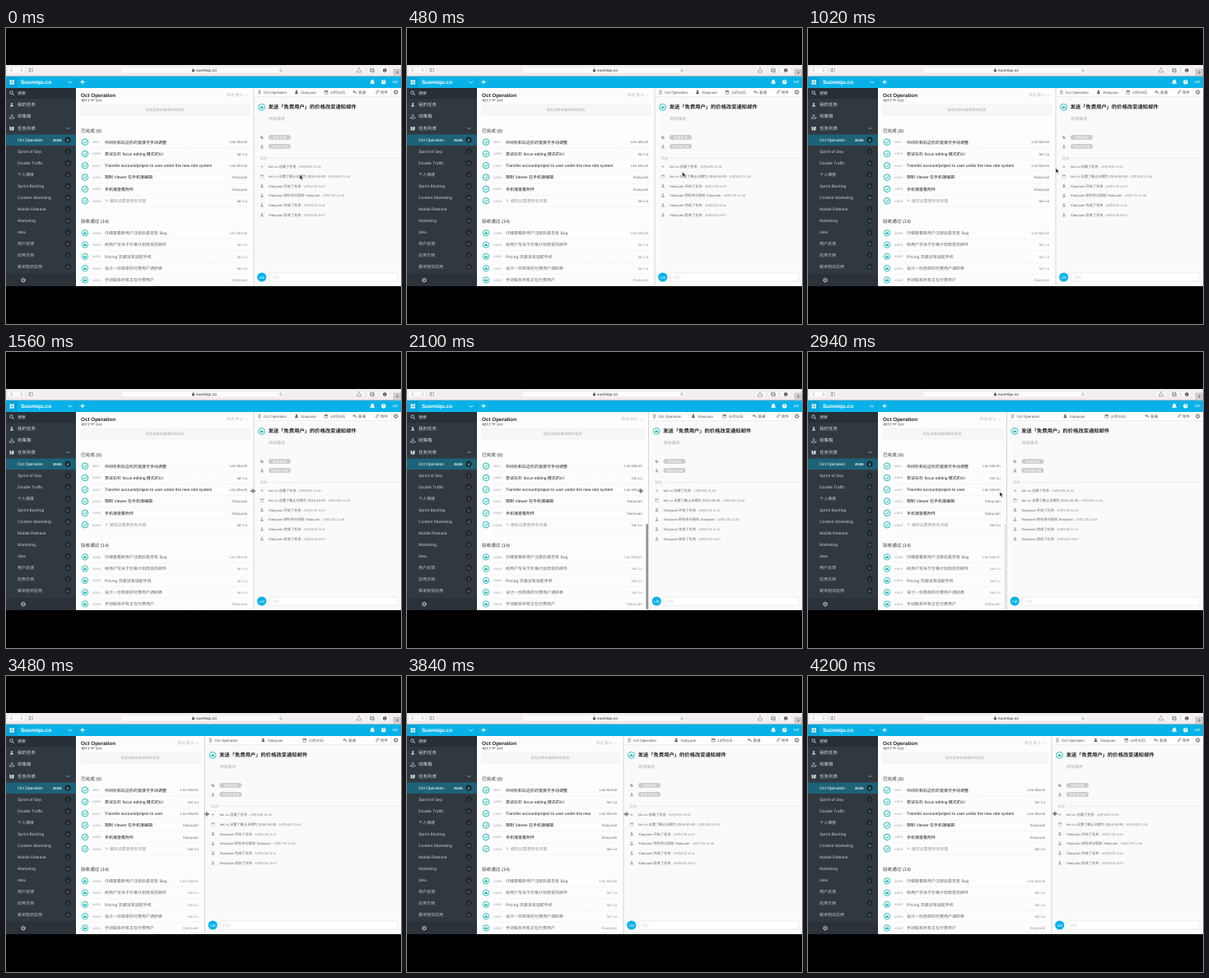
Recreate the animation shown at these times as an HTML page. Size 480 by 360 pixels, loop 4.26 s.

```html
<!DOCTYPE html>
<html lang="zh-CN">
<head>
<meta charset="utf-8">
<title>Task board</title>
<style>
html, body { margin: 0; width: 100%; height: 100%; overflow: hidden; background: #000; }
svg { display: block; width: 480px; height: 360px; }
text { font: 5px "Liberation Sans", "Noto Sans CJK SC", "Noto Sans CJK", sans-serif; text-rendering: geometricPrecision; white-space: pre; }
</style>
</head>
<body>
<svg id="stage" viewBox="0 0 480 360"></svg>
<script>
const LOOP = 4260, STEP = 60, HOME = 301;
const BLUE = '#08b2e8', TEAL = '#18b5b0';
const LEO = 'Leo Marsh', IAN = 'Ian Lu', YUAN = 'Xiaoyuan';
const LONG = 'Transfer account/project to user under the new role system';

// y is the vertical middle of the line
const text = (x, y, s, fill = '#333', size = 5, extra = '') =>
  `<text x="${x}" y="${y + size * .36}" fill="${fill}" style="font-size:${size}px;${extra}">${s}</text>`;
const BOLD = 'font-weight:700', END = 'text-anchor:end', MID = 'text-anchor:middle';
const rect = (x, y, w, h, fill, extra = '') =>
  `<rect x="${x}" y="${y}" width="${w}" height="${h}" fill="${fill}" ${extra}/>`;
const path = (d, stroke, width = .7, fill = 'none') =>
  `<path d="${d}" stroke="${stroke}" stroke-width="${width}" fill="${fill}"/>`;
const circle = (x, y, r, fill, stroke = 'none', width = .8) =>
  `<circle cx="${x}" cy="${y}" r="${r}" fill="${fill}" stroke="${stroke}" stroke-width="${width}"/>`;
// a group that follows the divider by the share k
const follow = (k, s) => `<g data-k="${k}">${s}</g>`;

const person = (x, y, c) => circle(x, y - 1.2, 1.1, c) + path(`M${x - 2} ${y + 2}q0-2 2-2t2 2z`, 'none', 0, c);
const gear = (x, y, c) => circle(x, y, 1.7, 'none', c, 1) +
  `<circle cx="${x}" cy="${y}" r="2.6" fill="none" stroke="${c}" stroke-width=".9" stroke-dasharray="1 1.04"/>`;
const calendar = (x, y, c) => path(`M${x - 1.8} ${y - 1.5}h3.6v3.4h-3.6z`, c, .5) + rect(x - 1.8, y - 1.8, 3.6, 1.2, c);
const stamp = (x, y, r) => circle(x, y, r, '#e8f8f8', TEAL, .8) +
  path(`M${x - 2} ${y + 1.5}v-1.5h1.2l.8-2 .8 2h1.2v1.5z`, 'none', 0, TEAL);

function browser() {
  const button = (x, w) => rect(x, 47.5, w, 7.5, '#fcfafb', 'rx="1" stroke="#ddd7da" stroke-width=".4"');
  return rect(0, 45, 480, 13.7, '#f3eef1') + button(2, 21) + button(25, 11) + button(140, 199) + button(423, 12) + button(439, 12) + button(454, 12) +
    path('M7.500 49.500l-1.700 1.800 1.700 1.800M18 49.500l1.700 1.800-1.700 1.800', '#777', .6) +
    path('M27.700 49.500h5v3.600h-5zM29.500 49.500v3.600', '#666', .5) +
    rect(226, 50.7, 3, 2.5, '#555') + path('M226.700 51v-1a.8.8 0 0 1 1.600 0v1', '#555', .5) +
    text(231, 51.4, 'suomiqu.co', '#333', 4.9) +
    path('M335.500 50.200a1.600 1.600 0 1 0 .5 1.300', '#666', .5) +
    path('M427.200 50.800h-.7v3h5v-3h-.7M429 52.500v-4l-1 1m1-1l1 1', '#555', .5) +
    path('M442.500 49.200h4v3.500h-4zM443.700 50.300h4v3.500h-4z', '#555', .5) +
    circle(460.3, 51.5, 2.3, '#444') + path('M460.300 50v2.500M459.200 51.700l1.100 1.100 1.100-1.100', '#fff', .5) +
    rect(471, 50, 9, 8.7, '#d2cdd0', 'stroke="#aaa" stroke-width=".4"') + path('M473.500 54h4M475.500 52v4', '#555', .5);
}

function header() {
  let s = rect(0, 58.7, 480, 14.3, BLUE) + rect(0, 58.7, 14, 14.3, '#0aa3d6') + rect(84.5, 58.7, .5, 14.3, '#0799ca');
  for (const x of [4.5, 7.5]) for (const y of [63.3, 66.3]) s += rect(x, y, 2.3, 2.3, '#fff');
  return s + text(18, 65.7, 'Suomiqu.co', '#fff', 6.5, BOLD) + path('M75.500 64.800l2.300 2.300 2.300-2.300', '#fff', .8) +
    path('M90.200 65.700h5.600M93 62.900v5.600', '#fff', 1) +
    path('M442.500 67.400q1-1 1-2.700a1.700 1.700 0 0 1 3.400 0q0 1.700 1 2.700zM444.500 68.200h1.500', '#fff', .4, '#fff') +
    circle(458.8, 65.7, 2.7, '#fff') + text(458.8, 65.7, '?', BLUE, 4.5, BOLD + ';' + MID) +
    text(473, 65.7, 'LM', '#fff', 4.6, MID);
}

function sidebar() {
  const pale = '#d5dade';
  const lists = [['Oct Operation', 8], ['Sprint of Sep', 3], ['Double Traffic', 11], ['个人梯度', 4], ['Sprint Backlog', 11],
    ['Content Marketing', 26], ['Mobile Release', 2], ['Marketing', 12], ['Idea', 4], ['用户反馈', 11], ['应用文档', 2], ['梭米短讯应用', 11]];
  let s = rect(0, 73, 85, 241, '#313940') + rect(0, 73, 85, 13, '#282f36') + rect(0, 299, 85, 15, '#2b3239');
  s += circle(6.5, 78.5, 1.8, 'none', pale) + path('M7.800 79.800l2 2', pale, .9) + text(14, 79.3, '搜索', pale);
  s += person(7, 93.5, pale) + text(14, 93.5, '我的任务', pale, 5.5);
  s += path('M4.300 108v2h5.400v-2M7 104.500v3.500M5.500 106.700l1.500 1.500 1.500-1.500', pale) + text(14, 107.5, '收集箱', pale, 5.5);
  s += path('M4.500 119.500l2 1v4.500l-2-1zM7.200 120.500l2.300-1v4.500l-2.300 1z', 'none', 0, pale) + text(14, 122, '任务列表', pale, 5.5) +
    path('M73.500 121l2 2 2-2', pale, .6);
  lists.forEach(([name, count], i) => {
    const y = 136.2 + i * 14;
    if (!i) s += rect(0, 129.5, 85, 13.5, '#1c6278') + text(57, y, '25/26', '#fff', 4.2, BOLD);
    s += circle(75, y, 3.6, i ? '#20262c' : '#152c36') + text(14, y, name, i ? '#c3c9ce' : '#fff') +
      text(75, y, count, i ? '#98a1a8' : '#fff', 3.8, MID);
  });
  return s + gear(21, 306.7, '#c3c9ce');
}

function row(y, id, title, owner, tone, verified) {
  const mark = verified ? stamp(96, y, 3.7)
    : circle(96, y, 3.8, '#e8f8f8', TEAL, .9) + path(`M94.200 ${y}l1.400 1.500 2.600-3`, TEAL, .9);
  return mark + text(105, y, '#' + id, '#999', 3.7) +
    `<g ${title === LONG ? 'id="long"' : ''}>${text(120, y, title, tone)}</g>` +
    `<path class="rule" data-y="${y + 7.1}" stroke="#e2e2e2" stroke-width=".5" stroke-dasharray="1 .7"/>` +
    follow(1, text(293.3, y, owner, verified ? '#999' : '#777', 4.6, END));
}

function board() {
  const done = [[824, '中间栏和右边栏的宽度可手动调整', LEO], [1625, '尝试右栏 focus editing 模式的UI', IAN], [1627, LONG, LEO],
    [1631, '限制 Viewer 在手机端编辑', YUAN], [1635, '手机端查看附件', YUAN], [1640, '↰ 通知设置更新有问题', IAN]];
  const passed = [[1590, '仔细查看新用户注册后是否有 Bug', LEO], [1615, '给用户写关于价格计划改变的邮件', IAN],
    [1620, 'Pricing 页面没有适配手机', IAN], [1621, '设计一份简单的付费用户调研表', IAN], [1610, '手动联系所有正在付费用户', YUAN]];
  let s = rect(85, 73, 395, 241, '#fdfdfd') + text(91, 87, '进行中 (0)', '#333', 5.6) + rect(85, 73, 395, 13.5, '#fdfdfd') +
    text(91, 81.4, 'Oct Operation', '#222', 6.3, BOLD) +
    follow(1, text(288, 81.3, '筛选·默认', '#bbb', 4.6, END) + path('M290.500 81l1.500 1.500 1.500-1.500', '#bbb', .5)) +
    rect(91, 93, 205, 13, '#f7f7f7', 'id="empty" stroke="#e2e2e2" stroke-width=".5" stroke-dasharray="1.500 1"') +
    follow(.5, text(193, 99.6, '现在没有在做哪样的任务', '#a8a8a8', 4.3, MID)) +
    text(91, 125, '已完成 (6)', '#333', 5.6) + text(91, 235.3, '验收通过 (14)', '#333', 5.6);
  done.forEach((r, i) => s += row(138.7 + i * 14.3, ...r, i === 5 ? '#999' : '#222', false));
  passed.forEach((r, i) => s += row(249.3 + i * 14.3, ...r, '#666', true));
  return s + follow(1, rect(298, 209, 2.4, 104, '#8c8c8c', 'id="bar" rx="1.200"'));
}

function details() {
  const grey = '#aaa', dark = '#555';
  const log = [[IAN, '创建了任务', '16日 21:04'], [IAN, '设置了截止日期为 2014-10-20', '16日 21:04'], [YUAN, '开始了任务', '17日 11:47'],
    [YUAN, '把任务分配给 ' + YUAN, '17日 11:48'], [YUAN, '完成了任务', '22日 11:11'], [YUAN, '验收了任务', '22日 20:57']];
  const pill = (y, w, s) => rect(319, y - 3, w, 6, '#ccc', 'rx="3"') + text(319 + w / 2, y, s, '#fff', 4.2, MID);
  let s = rect(HOME, 73, 300, 241, '#fafafa') + rect(HOME, 73, 300, 11, '#fefefe') + rect(HOME, 83.5, 300, .5, '#dcdcdc') +
    rect(HOME - .4, 73, .9, 241, '#d2d2d2') +
    path('M306.300 76.300h3.500M306.300 78.100h3.500M306.300 79.900h3.500', dark, .6) + text(313, 78.1, 'Oct Operation', dark, 4.5) +
    stamp(310.7, 96.3, 4) + text(318.7, 95.7, '发送「免费用户」的价格改变通知邮件', '#222', 6.3, BOLD) +
    text(319, 109.8, '添加描述', grey) +
    path('M309 131.500h2.200l2 2-2 2-2.200-2.200z', 'none', 0, grey) + pill(133, 27, '添加标签') +
    person(311, 144.3, grey) + pill(144, 27, '添加关注者') +
    text(308.5, 158, '动态', '#b5b5b5', 4.4) + rect(319, 158, 300, .4, '#ddd');
  log.forEach(([who, what, when], i) => {
    const y = 168.7 + i * 11.7;
    s += i === 0 ? path(`M309.300 ${y}h3.400M311 ${y - 1.7}v3.400`, grey) : i === 1 ? calendar(311, y, grey) : person(311, y, grey);
    s += text(319, y, `${who} ${what}<tspan fill="#888" style="font-size:3.8px"> - 10月${when}</tspan>`, '#666', 4.2);
  });
  s += circle(310.8, 303, 5.6, BLUE) + text(310.8, 303, 'LM', '#fff', 4.5, MID) +
    rect(320, 298, 156, 10, '#fff', 'id="input" rx=".8" stroke="#ddd" stroke-width=".5"') + text(323, 303, '讨论', '#ccc', 4.6);
  return follow(1, s) +
    follow(.68, person(353, 78.1, dark) + text(358.3, 78.1, YUAN, dark, 4.5)) +
    follow(.44, calendar(389, 78.1, dark) + text(394, 78.1, '10月20日', dark, 4.3)) +
    follow(.2, path('M426 80q0-2.500-2-2.500h-2m1.500-1.500l-1.500 1.500 1.500 1.500', dark, .7) + text(428, 78.1, '普通', dark, 4.5)) +
    path('M450 77.600l1.700-1.700q1.500-1 1.500.7l-2.200 2.800q-1.500 1-1.500-.5l1.800-2.200', dark, .5) + text(455, 78.1, '附件', dark, 4.5) +
    rect(468, 74, .4, 9, '#ddd') + gear(473.7, 78.1, '#666');
}

const RESIZE = 'M-.4-2.500v5M.4-2.500v5M-2.800 0h5.600M-1.600-1.300L-2.900 0-1.600 1.300M1.600-1.300L2.900 0 1.600 1.300';
const pointers = '<g id="arrow">' + path('M0 0v5.800l1.400-1.200.9 2.100 1-.4-.9-2.100h1.800z', '#fff', .4, '#222') + '</g>' +
  '<g id="resize">' + path(RESIZE, '#fff', 1.4) + path(RESIZE, '#333', .6) + '</g>';

const $ = id => document.getElementById(id);
$('stage').innerHTML = board() + details() + sidebar() + header() + browser() + rect(0, 314, 480, 46, '#000') + pointers;

// keys are [time, value...]
const DIVIDER = [[0, 301], [1960, 301], [2100, 293.5], [2220, 272], [2340, 250], [2460, 241.5], [3480, 241.5], [3660, 248], [3840, 263], [4200, 296], [4260, 301]];
const POINTER = [[0, 357, 178.5], [300, 350, 177], [840, 304, 171], [1020, 301, 170.5], [1320, 301, 169], [1900, 299, 169], [2100, 284, 169],
  [2340, 240, 169], [2460, 233, 169], [2940, 233, 170], [3360, 242, 168], [3540, 245, 168], [3840, 266.5, 168], [4200, 300, 167.5], [4260, 304, 167.5]];

function at(keys, t) {
  const i = Math.max(1, keys.findIndex(k => k[0] >= t));
  const a = keys[i - 1], b = keys[i], p = (t - a[0]) / (b[0] - a[0]);
  return a.slice(1).map((v, n) => v + (b[n + 1] - v) * p);
}

const movers = document.querySelectorAll('[data-k]'), rules = document.querySelectorAll('.rule');
const longText = $('long').firstChild;

function draw(t) {
  const [edge] = at(DIVIDER, t), [x, y] = at(POINTER, t), shift = edge - HOME;
  for (const m of movers) m.setAttribute('transform', `translate(${m.dataset.k * shift} 0)`);
  for (const r of rules) r.setAttribute('d', `M105 ${r.dataset.y}H${edge - 6}`);
  $('empty').setAttribute('width', 205 + shift);
  $('input').setAttribute('width', 156 - shift);

  // drop whole words that no longer fit beside the owner
  const words = LONG.split(' ');
  longText.textContent = LONG;
  while (longText.getComputedTextLength() > edge - 158.5) {
    words.pop();
    longText.textContent = words.join(' ');
  }

  const resizing = t > 1080 && t < 2640 || t > 3360;
  for (const [id, on] of [['arrow', !resizing], ['resize', resizing]]) {
    $(id).setAttribute('transform', `translate(${x} ${y})`);
    $(id).setAttribute('visibility', on ? 'visible' : 'hidden');
  }
  $('bar').setAttribute('opacity', t < 1980 ? 0 : Math.max(0, Math.min(1, (3000 - t) / 300)));
}

const start = performance.now();
function tick() {
  const t = (performance.now() - start) % LOOP;
  draw(Math.floor(t / STEP) * STEP);
  requestAnimationFrame(tick);
}
tick();
</script>
</body>
</html>
```
